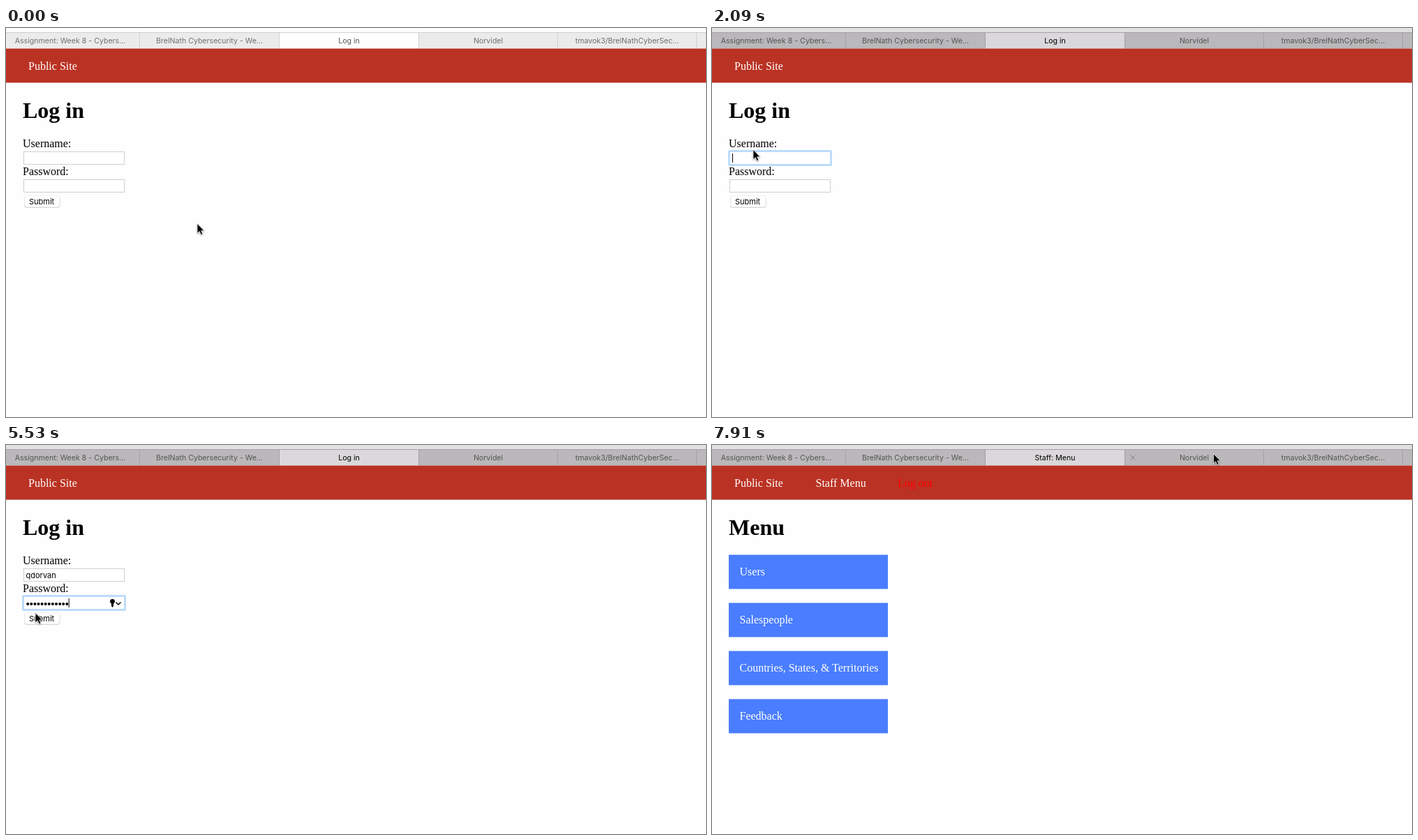
Write an HTML page that moves like this. It is 1003 px wide and 558 px high and loops after 8000 ms.

```html
<!DOCTYPE html>
<html lang="en">
<head>
<meta charset="utf-8">
<title>Log in</title>
<style>
  html, body { margin: 0; width: 100%; height: 100%; overflow: hidden; background: #fefefe; }
  svg { display: block; width: 100%; height: 100%; }
  text { font: 16px "Liberation Serif", serif; white-space: pre; }
  .heading { font-size: 32px; font-weight: bold; }
  .ui { font: 11px Inter, sans-serif; }
  .tab { font: 10.6px Inter, sans-serif; text-anchor: middle; }
  .light { fill: #fff; }
  .field { fill: #fff; stroke: #cfcfcf; }
  .ring { fill: none; stroke: #bddcfa; stroke-width: 3; }
  .line { fill: none; stroke: #000; }
</style>
</head>
<body>
<svg viewBox="0 0 1003 558">
  <defs>
    <linearGradient id="blue" x2="0" y2="1">
      <stop stop-color="#58a5fb"/><stop offset="1" stop-color="#0b57dc"/>
    </linearGradient>
  </defs>
  <rect width="1003" height="558" fill="#fefefe"/>
  <g id="tabs"></g>
  <rect y="29.5" width="1003" height="49" fill="#ba3223"/>
  <text class="light" x="32" y="60">Public Site</text>

  <g id="login">
    <text class="heading" x="24" y="129">Log in</text>
    <text x="24" y="171">Username:</text>
    <text x="24" y="211">Password:</text>
    <rect class="field" x="25.5" y="177.5" width="144" height="18"/>
    <rect class="field" x="25.5" y="217.5" width="144" height="18"/>
    <rect class="ring" id="ring" x="24.5" width="146" height="20" rx="1"/>
    <text class="ui" id="username" x="28.5" y="191"></text>
    <g id="dots"></g>
    <g id="key">
      <circle cx="152.5" cy="224.3" r="3.4"/>
      <path d="M151 226h3v5l-1.5 2l-1.5-2z"/>
      <path class="line" d="M157.5 225.5l3.5 3.5l3.5-3.5" stroke-width="1.5"/>
    </g>
    <path class="line" id="caret"/>
    <rect x="26" y="241" width="51.5" height="17" rx="4" fill="#d2d2d2"/>
    <rect id="button" x="26.5" y="240.5" width="50.5" height="16.5" rx="3.5" stroke-width=".5"/>
    <text class="ui" id="submit" x="33" y="253">Submit</text>
  </g>

  <g id="menu">
    <text class="light" x="148.5" y="60">Staff Menu</text>
    <text x="266" y="60" fill="#f00">Log out</text>
    <text class="heading" x="24" y="129">Menu</text>
  </g>

  <g id="pointer">
    <path id="arrow" d="M.5.5V14.6L3.7 11.7L5.9 16.6L8.3 15.6L6.2 10.8H10.6Z"
      stroke="#fff" stroke-width=".8" style="filter:drop-shadow(0 1px 1px #0006)"/>
    <path class="line" id="beam" d="M-1.5-3.5Q1-3.5 1-1.5Q1-3.5 3.5-3.5M1-2V9.5M-1.5 11Q1 11 1 9Q1 11 3.5 11M-1 5H3"/>
  </g>
</svg>
<script>
const LOOP = 8000, TICK = 149.25;
const USER = "qdorvan", DOT_COUNT = 12, DOT_PITCH = 5.1;
const TAB_EDGES = [0, 191.5, 391.5, 591.5, 790.5, 989.5, 1003];
const TAB_NAMES = ["Assignment: Week 8 - Cybers...", "BrelNath Cybersecurity - We...",
  "Log in", "Norvidel", "tmavok3/BrelNathCyberSec...", ""];
const ACTIVE_TAB = 2;

// Tick at which each event happens
const FOCUS = 14, BEAM = 16, BLINK = 18, PASSWORD = 29, PASTE = 33,
  ARROW = 37, PRESS = 39, MENU = 45, TITLE = 46, HOVER = 53;
const TYPING = [20, 21, 22, 22, 24, 25, 26];

// Pointer moves: start tick, end tick, x, y
const START = [273.5, 280];
const MOVES = [
  [0, 1, 135.5, 212.5],
  [6, 13, 58.5, 174],
  [34, 38, 38.5, 252.5],
  [40, 43, 496, 226],
  [45, 49, 352.5, 212.5],
  [50, 53, 718, 12]
];

const $ = id => document.getElementById(id);
const show = (id, on) => $(id).setAttribute("visibility", on ? "visible" : "hidden");
const set = (node, attrs) => {
  for (const name in attrs) node.setAttribute(name, attrs[name]);
};
function add(parent, tag, attrs, text = "") {
  const node = document.createElementNS("http://www.w3.org/2000/svg", tag);
  set(node, attrs);
  node.textContent = text;
  return parent.appendChild(node);
}

const strip = add($("tabs"), "rect", { width: 1003, height: 6 });
const tabs = TAB_NAMES.map((name, i) => {
  const x = TAB_EDGES[i], width = TAB_EDGES[i + 1] - x;
  const middle = i ? x + width / 2 : 92;
  return {
    box: add($("tabs"), "rect", { x, y: 6, width, height: 23.5 }),
    label: add($("tabs"), "text", { class: "tab", x: middle, y: 21.5 }, name)
  };
});
const edges = add($("tabs"), "path", {
  fill: "none",
  d: "M0 6.5H1003" + TAB_EDGES.slice(1, -1).map(x => `M${x} 6V29`).join("")
});
add($("tabs"), "path", { id: "close", d: "M599.5 14.5l7 7m0-7l-7 7", stroke: "#858385" });

for (let i = 0; i < DOT_COUNT; i++)
  add($("dots"), "circle", { cx: 31.2 + i * DOT_PITCH, cy: 228, r: 2 });

["Users", "Salespeople", "Countries, States, & Territories", "Feedback"].forEach((name, i) => {
  add($("menu"), "rect", { x: 24, y: 157.5 + i * 69, width: 228, height: 49, fill: "#4a7dff" });
  add($("menu"), "text", { class: "light", x: 39.5, y: 187 + i * 69 }, name);
});

function pointerAt(tick) {
  let [x, y] = START;
  for (const [from, to, endX, endY] of MOVES) {
    const p = Math.min(1, Math.max(0, (tick - from) / (to - from)));
    const eased = p * p * (3 - 2 * p);
    x += (endX - x) * eased;
    y += (endY - y) * eased;
  }
  return [x, y];
}

function drawTabs(tick) {
  const focused = tick >= FOCUS;
  set(strip, { fill: focused ? "#e2e0e2" : "#fdfdfd" });
  set(edges, { stroke: focused ? "#a3a1a3" : "#d0d0d0" });
  tabs.forEach(({ box, label }, i) => {
    const active = i === ACTIVE_TAB;
    set(box, { fill: focused ? (active ? "#dad8da" : "#bab8ba") : (active ? "#fefefe" : "#ebebeb") });
    set(label, { fill: focused ? (active ? "#000" : "#555") : (active ? "#555" : "#707070") });
  });
  tabs[ACTIVE_TAB].label.textContent = tick >= TITLE ? "Staff: Menu" : "Log in";
  show("close", tick >= HOVER);
}

function drawForm(tick) {
  const inPassword = tick >= PASSWORD, pasted = tick >= PASTE, pressed = tick >= PRESS;
  const focused = tick >= FOCUS && !pressed;
  const blinkedOff = (tick >= BLINK && tick < TYPING[0]) || tick === PASTE - 1;
  const username = $("username");
  username.textContent = USER.slice(0, TYPING.filter(at => tick >= at).length);

  let caretX = 29.5;
  if (inPassword) caretX += pasted ? DOT_COUNT * DOT_PITCH - .5 : 0;
  else if (username.textContent) caretX = 28.8 + username.getComputedTextLength();
  set($("caret"), { d: `M${caretX} ${inPassword ? 220 : 180}v13` });
  set($("ring"), { y: inPassword ? 216.5 : 176.5 });
  set($("button"), { fill: pressed ? "url(#blue)" : "#fff", stroke: pressed ? "#1560dc" : "#dedede" });
  set($("submit"), { fill: pressed ? "#fff" : "#000" });

  // Children with their own visibility must also follow the page
  show("ring", focused);
  show("caret", focused && !blinkedOff);
  show("key", focused && inPassword);
  show("dots", pasted && tick < MENU);
}

function draw(now) {
  const tick = Math.floor((now % LOOP + 4) / TICK);
  const beam = tick >= BEAM && tick < ARROW;
  drawTabs(tick);
  drawForm(tick);
  show("login", tick < MENU);
  show("menu", tick >= MENU);
  show("arrow", !beam);
  show("beam", beam);
  set($("pointer"), { transform: `translate(${pointerAt(tick)})` });
}

const began = performance.now();
function frame() {
  draw(performance.now() - began);
  requestAnimationFrame(frame);
}
frame();
</script>
</body>
</html>
```
